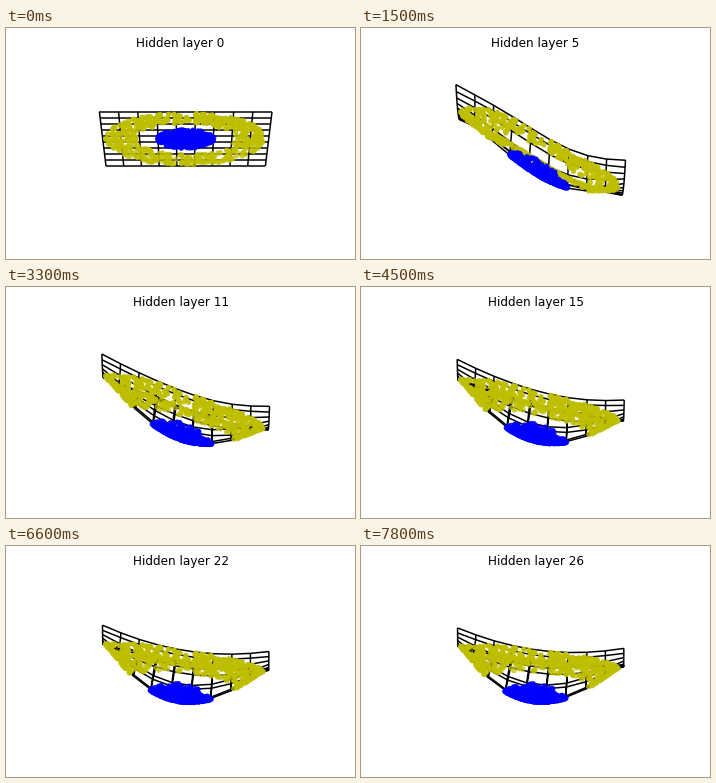
Write a matplotlib script that moves like this. It is 349 px wide and 231 px high and loops after 8000 ms.

```python
import numpy as np
import matplotlib.pyplot as plt
from matplotlib.animation import FuncAnimation
from matplotlib.collections import LineCollection

W, H, DPI = 349, 231, 72
FRAME_MS, LOOP_MS, LAYER_MS = 100, 8000, 300


def project(u, v, layer):
    """Map sheet coordinates in [-1, 1] to stage pixels for a given layer."""
    settled = 1 - np.exp(-layer)
    swing = layer / 3 * np.exp(1 - layer / 3)
    tilt = 52 * settled * np.exp(-layer / 16)
    depth = 5 + 22 * np.exp(-layer / 6)
    dip = 48 * (1 - np.exp(-layer / 6))
    drift = 1 - np.exp(-layer / 12)
    bowl = (1 - u**2) ** 1.3 * np.exp(-v**2 / .28)

    y = 111 - .1 * layer + 11 * swing
    y = y + tilt * u + 5 * swing * np.sin(np.pi * u)
    y = y - v * (depth + 3 * settled * u**2) - 8 * settled * (u * v) ** 2
    y = y + dip * bowl

    half = 83 + 3.3 * np.exp(-layer / 8) * v
    x = 179.7 + u * half + drift * bowl * (10 * u - 7)
    return np.stack([x, y], axis=-1)


def ring(rng, count, inner, outer):
    radius = np.sqrt(rng.uniform(inner**2, outer**2, count))
    angle = rng.uniform(0, 2 * np.pi, count)
    u, v = radius * np.cos(angle), radius * np.sin(angle)
    order = np.argsort(v)
    return u[order], v[order]


rng = np.random.default_rng(4)
outer = ring(rng, 470, .59, .96)
inner = ring(rng, 400, 0, .34)
gu, gv = np.meshgrid(np.linspace(-1, 1, 10), np.linspace(-1, 1, 10))

fig = plt.figure(figsize=((W + 1e-6) / DPI, (H + 1e-6) / DPI), dpi=DPI,
                 facecolor="white")
ax = fig.add_axes([0, 0, 1, 1])
ax.set(xlim=(0, W), ylim=(H, 0))
ax.axis("off")

mesh = ax.add_collection(LineCollection([], colors="black", linewidths=1.5, zorder=1))


def dots(points, color, zorder):
    u, v = points
    return ax.scatter(u, v, s=20, color=color, alpha=.8 + .2 * v, zorder=zorder)


clouds = [(outer, dots(outer, "y", 2)), (inner, dots(inner, "b", 3))]
title = ax.text(174.5, 19, "", ha="center", va="baseline", fontsize=12,
                family="DejaVu Sans", color="black")


def update(frame):
    layer = frame * FRAME_MS // LAYER_MS
    grid = project(gu, gv, layer)
    mesh.set_segments([*grid, *grid.swapaxes(0, 1)])
    for (u, v), cloud in clouds:
        cloud.set_offsets(project(u, v, layer))
    title.set_text(f"Hidden layer {layer}")
    return [mesh, title] + [cloud for _, cloud in clouds]


anim = FuncAnimation(fig, update, frames=LOOP_MS // FRAME_MS, interval=FRAME_MS,
                     repeat=True, repeat_delay=0)
plt.show()
```
